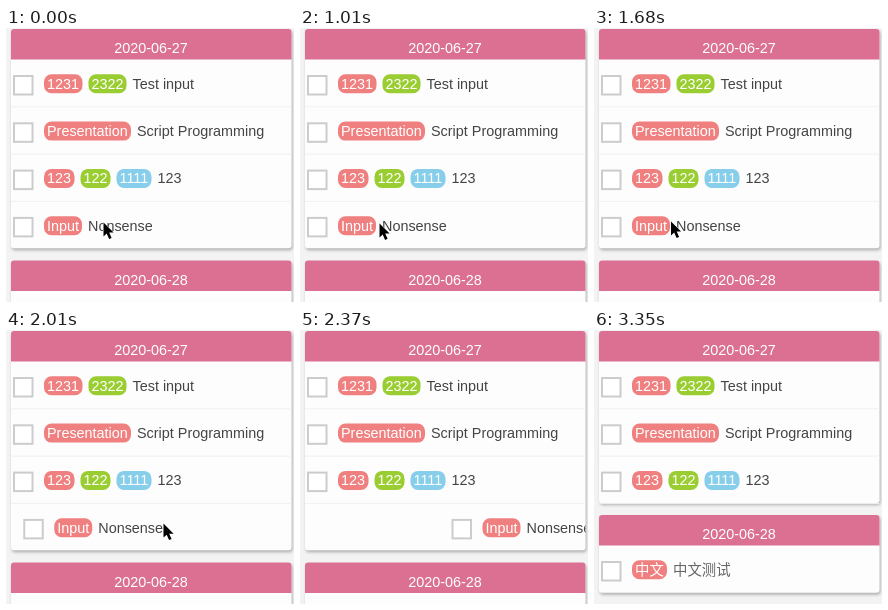
Animation of 288x274 px, one loop 4.94 s. Source, as an HTML page:

```html
<!DOCTYPE html>
<html lang="en">
<head>
<meta charset="utf-8">
<title>Swipe to remove</title>
<style>
html, body { margin: 0; width: 100%; height: 100%; overflow: hidden; background: #f3f3f3; }
svg { display: block; width: 100%; height: 100%; }
text { font: 14.4px "Liberation Sans", Arial, sans-serif; fill: #444; }
.white { fill: #fff; }
.cjk { font-family: "Noto Sans CJK SC", "Noto Sans CJK", "Noto Sans CJK JP", sans-serif; font-weight: 300; fill: #666; }
.cjk.white { fill: #fff; }
.card { filter: drop-shadow(1px 2px 1.5px rgba(0, 0, 0, .28)); }
</style>
</head>
<body>
<svg id="stage" viewBox="0 0 288 274">
  <clipPath id="inside"><rect x="5" y="174" width="280.5" height="46"/></clipPath>
</svg>
<script>
const LOOP = 4940, REMOVED = 3350;
const CORAL = '#f08080', GREEN = '#9acd32', SKY = '#87ceeb';
const ROW = 47.3, HEAD = 30.5;
const stage = document.getElementById('stage');

function add(parent, tag, attrs, text) {
  const el = document.createElementNS('http://www.w3.org/2000/svg', tag);
  for (const key in attrs) el.setAttribute(key, attrs[key]);
  if (text) el.textContent = text;
  parent.appendChild(el);
  return el;
}

// A card with a header and room for a number of rows, at the local origin.
function card(title, rows) {
  const g = add(stage, 'g');
  const box = add(g, 'rect', { class: 'card', x: 5, width: 280.5, height: HEAD + rows * ROW, rx: 3, fill: '#fdfdfd' });
  add(g, 'path', { d: `M5 ${HEAD}V3q0-3 3-3h274.5q3 0 3 3V${HEAD}z`, fill: '#db7093' });
  add(g, 'text', { x: 145, y: 24, 'text-anchor': 'middle', class: 'white' }, title);
  return { g, box };
}

// Each tag is [text, colour, width].
function row(parent, index, tags, label, labelX, font = '') {
  const g = add(parent, 'g');
  const y = HEAD + index * ROW;
  add(g, 'rect', { x: 8, y: y + 16.5, width: 18.5, height: 18.5, fill: '#fff', stroke: '#ccc', 'stroke-width': 2 });
  let x = 38;
  for (const [text, color, width] of tags) {
    add(g, 'rect', { x, y: y + 14.8, width, height: 19, rx: 7.5, fill: color });
    add(g, 'text', { x: x + 3, y: y + 29.2, class: 'white ' + font }, text);
    x += width + 6;
  }
  add(g, 'text', { x: labelX, y: y + 29.2, class: font }, label);
  return g;
}

const today = card('2020-06-27', 4);
const next = card('2020-06-28', 1);
today.g.setAttribute('transform', 'translate(0 1)');
for (const i of [1, 2, 3])
  add(today.g, 'rect', { x: 5, y: HEAD + i * ROW - .5, width: 280.5, height: 1, fill: '#f1f1f1' });
row(today.g, 0, [['1231', CORAL, 38.5], ['2322', GREEN, 38]], 'Test input', 126.5);
row(today.g, 1, [['Presentation', CORAL, 87]], 'Script Programming', 131);
row(today.g, 2, [['123', CORAL, 30.5], ['122', GREEN, 30], ['1111', SKY, 35]], '123', 151.5);
const frame = add(stage, 'g', { 'clip-path': 'url(#inside)' });
const item = row(frame, 3, [['Input', CORAL, 38]], 'Nonsense', 82);
row(next.g, 0, [['中文', CORAL, 35]], '中文测试', 79, 'cjk');

const cursor = add(stage, 'path', {
  d: 'M.5 .5V14.5L3.7 11.6L6.1 17L8.6 15.9L6.2 10.6H10.6z',
  stroke: '#fff', 'stroke-width': 1, 'stroke-linejoin': 'round', 'paint-order': 'stroke'
});

// Pointer path: time, x, y.
const path = [
  [10, 97, 194], [190, 67, 195], [550, 67, 195], [720, 69, 194.5],
  [930, 69, 194.5], [1100, 90, 195.3], [1280, 111, 193], [1500, 111, 193],
  [1680, 76.5, 193], [1845, 76.5, 193], [2010, 156.5, 193],
  [2230, 262, 201.5], [2370, 378, 212]
];

function pointer(t) {
  let i = path.findIndex(p => p[0] > t);
  if (i < 0) return path[path.length - 1].slice(1);
  if (i === 0) return path[0].slice(1);
  const [t0, x0, y0] = path[i - 1], [t1, x1, y1] = path[i];
  const k = (t - t0) / (t1 - t0);
  return [x0 + (x1 - x0) * k, y0 + (y1 - y0) * k];
}

function draw(t) {
  const [x, y] = pointer(t);
  cursor.setAttribute('transform', `translate(${x} ${y})`);
  cursor.style.display = t < 2370 ? '' : 'none';

  // The drag grows with the square of the pull, then slides out and fades.
  const pull = t > 1845 ? x - 76.5 : 0;
  const out = Math.max(0, Math.min(1, (t - 2370) / 170));
  item.setAttribute('transform', `translate(${pull * pull / 632 + out * 112} 1)`);
  item.setAttribute('opacity', 1 - out);
  item.style.display = out < 1 ? '' : 'none';

  const rows = t < REMOVED ? 4 : 3;
  today.box.setAttribute('height', HEAD + rows * ROW - .5);
  next.g.setAttribute('transform', `translate(0 ${t < REMOVED ? 232.5 : 185})`);
}

const start = performance.now();
function tick() {
  draw((performance.now() - start) % LOOP);
  requestAnimationFrame(tick);
}
tick();
</script>
</body>
</html>
```
